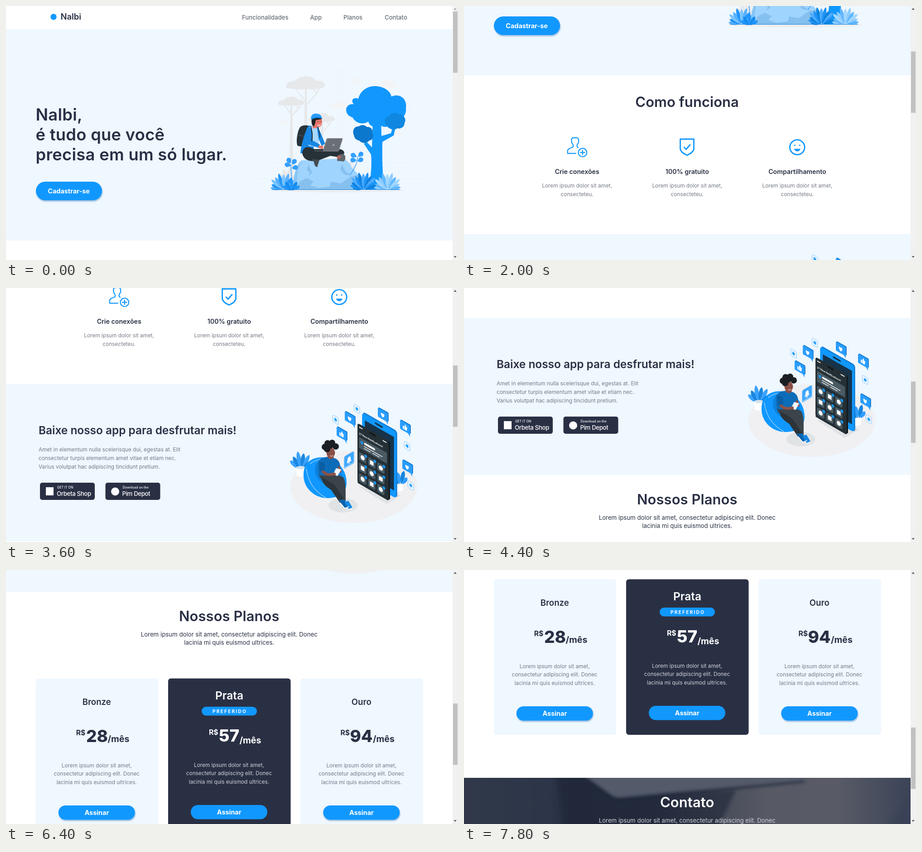
An HTML page for the animation above (8 s loop, 998 px wide and 561 px high).

```html
<!DOCTYPE html>
<html lang="pt">
<head>
<meta charset="utf-8">
<title>Página</title>
<style>
html,body{margin:0;width:100%;height:100%;overflow:hidden;background:#fff}
#stage{position:fixed;inset:0;overflow:hidden;contain:strict}
#page,#bar{position:absolute;left:0;top:0;display:block}
text{font-family:Inter,sans-serif;font-optical-sizing:none;fill:#2a3044}
.m{text-anchor:middle}
.logo{font-size:18.4px;font-weight:600}
.nav{font-size:13.1px;font-weight:500;letter-spacing:.04px;fill:#656b75}
.h1{font-size:36.3px;font-weight:600;letter-spacing:.3px}
.h2{font-size:30.9px;font-weight:600;letter-spacing:.1px}
.h3{font-size:24.4px;font-weight:600}
.feat{font-size:14.2px;font-weight:600}
.body{font-size:11.8px;fill:#747a84}
.sub{font-size:13.25px}
.btn{font-size:14.4px;font-weight:700;fill:#fff}
.plan{font-size:18.6px;font-weight:600}
.top{font-size:24.5px;font-weight:600}
.tag{font-size:10.2px;font-weight:700;letter-spacing:2.2px;fill:#fff}
.cur{font-size:15.8px;font-weight:700}
.num{font-size:37px;font-weight:800}
.per{font-size:19.5px;font-weight:700}
.get{font-size:7.1px;font-weight:500}
.shop{font-size:13.3px;font-weight:500;letter-spacing:-.4px}
.news{font-size:5.7px;font-weight:700}
.w{fill:#fff}
.pale{fill:#d2d4d9}
</style>
</head>
<body>
<div id="stage">
<svg id="page" width="986" height="2000"></svg>
<svg id="bar" width="998" height="561">
  <rect x="986" width="12" height="561" fill="#f1f1f1"/>
  <path id="up" d="M988.5 8.2L991.7 4.6L995 8.2Z" fill="#505050"/>
  <path d="M988.5 552.4L991.7 556L995 552.4Z" fill="#505050"/>
  <rect id="thumb" x="987" y="12" width="10" height="135.5" fill="#c1c1c1"/>
</svg>
</div>
<script>
const BLUE = '#1198ff', DARK = '#2a3044', SKY = '#eff7ff', GREY = '#e6e8ea', COAL = '#263238';

const path = (d, fill, more = '') => `<path d="${d}" fill="${fill}" ${more}/>`;
const line = (d, color, w = 1) => path(d, 'none', `stroke="${color}" stroke-width="${w}" stroke-linecap="round" stroke-linejoin="round"`);
const rect = (x, y, w, h, fill, r = 0, more = '') => `<rect x="${x}" y="${y}" width="${w}" height="${h}" rx="${r}" fill="${fill}" ${more}/>`;
const oval = (x, y, rx, ry, fill) => `<ellipse cx="${x}" cy="${y}" rx="${rx}" ry="${ry}" fill="${fill}"/>`;
const dot = (x, y, r, fill) => oval(x, y, r, r, fill);
const text = (x, y, cls, s) => `<text x="${x}" y="${y}" class="${cls}">${s}</text>`;
const lines = (x, y, step, cls, list) => list.map((s, i) => text(x, y + i * step, cls, s)).join('');
const at = (x, y, s) => `<g transform="translate(${x} ${y})">${s}</g>`;
const iso = (x, y, s, slope = .5) => `<g transform="matrix(.88 ${slope} 0 1 ${x} ${y})">${s}</g>`;
const leaf = (x, y, len, w, deg, fill) =>
  path(`M0 0C${-w} ${-len * .45} ${-w} ${-len * .85} 0 ${-len}C${w} ${-len * .85} ${w} ${-len * .45} 0 0Z`, fill, `transform="translate(${x} ${y}) rotate(${deg})"`);

// Leaves spread from one root, shorter towards the sides
function fan(x, y, n, len, spread, fills, w = 5) {
  let s = '';
  for (let i = 0; i < n; i++) {
    const k = i / Math.max(n - 1, 1) * 2 - 1;
    s += leaf(x + k * 4, y, len * (1 - .32 * k * k - .1 * (i % 2)), w, k * spread, fills[i % fills.length]);
  }
  return s;
}

let seed = 7;
const rnd = () => (seed = seed * 16807 % 2147483647) / 2147483647;
let specks = '';
for (let i = 0; i < 34; i++) specks += rect((rnd() * 30).toFixed(1), (rnd() * 30).toFixed(1), .9, .9, '#0a5fa8');

const defs = `<defs>
<pattern id="grain" width="30" height="30" patternUnits="userSpaceOnUse"><g opacity=".3">${specks}</g></pattern>
<filter id="soft" x="-20%" y="-40%" width="140%" height="190%"><feGaussianBlur stdDeviation="1.5"/></filter>
<filter id="haze" x="-20%" y="-40%" width="140%" height="180%"><feGaussianBlur stdDeviation="3"/></filter>
<linearGradient id="desk"><stop offset="0" stop-color="#30384a"/><stop offset=".19" stop-color="#2d3548"/><stop offset=".24" stop-color="#242b3e"/><stop offset=".42" stop-color="#293043"/><stop offset=".56" stop-color="#454a58"/><stop offset=".68" stop-color="#575a65"/><stop offset=".84" stop-color="#585b66"/><stop offset="1" stop-color="#3b4357"/></linearGradient>
<clipPath id="cut"><rect y="1846" width="986" height="154"/></clipPath>
</defs>`;

const pill = (x, y, w, h, shade = true) =>
  (shade ? rect(x + 1, y + 2.5, w, h, '#0b5ea8', h / 2, 'opacity=".42" filter="url(#soft)"') : '') + rect(x, y, w, h, BLUE, h / 2);
const grainy = (d, fill) => path(d, fill) + path(d, 'url(#grain)');

const cloud = (x, y, k) => `<g transform="translate(${x} ${y}) scale(${k})">${path('M-22 8C-26 1-17-3-13-1C-11-12 4-13 7-4C13-9 20-3 18 1C25 1 25 8 20 8Z', '#f3f4f6')}</g>`;

function savanna(x, y, w, h, base, tw) {
  const r = w / 2;
  return path(`M${x - r} ${y}C${x - r - 3} ${y - h * .5} ${x - r * .7} ${y - h * .6} ${x - r * .6} ${y - h * .55}C${x - r * .3} ${y - h * 1.15} ${x + r * .4} ${y - h * 1.1} ${x + r * .5} ${y - h * .6}C${x + r} ${y - h * .7} ${x + r + 3} ${y - h * .1} ${x + r * .85} ${y}C${x + r * .4} ${y + h * .15} ${x - r * .5} ${y + h * .15} ${x - r} ${y}Z`, GREY)
    + path(`M${x - 2} ${y}L${x + 2} ${y}L${x + tw} ${base}L${x - tw} ${base}Z`, GREY)
    + line(`M${x} ${y + r * .9}L${x + r * .55} ${y + r * .3}L${x + r * .7} ${y}M${x + r * .55} ${y + r * .3}L${x + r * .35} ${y}M${x} ${y + r * .7}L${x - r * .4} ${y + r * .22}L${x - r * .5} ${y}`, GREY, 2.2);
}

function forest() {
  return line('M583 141H732V346H583ZM742 141H891V346H742ZM552 382H926', '#eaf1f8', .8)
    + cloud(771, 165, .55) + cloud(842, 172, .95) + cloud(735, 219, .95) + cloud(612, 257, .55) + cloud(862, 281, .55)
    + oval(732, 407, 148, 4.5, '#ebeef2')
    + savanna(662, 181, 86, 26, 390, 5) + savanna(630, 218, 58, 18, 385, 4.5) + savanna(698, 254, 56, 18, 350, 4)
    + fan(620, 392, 4, 38, 28, [GREY], 6) + fan(757, 365, 4, 34, 32, [GREY], 4);
}

function bigTree() {
  return path('M810 250H828L829 287L850 281L854 266L860 268L856 286L831 300C830 345 832 385 837 405H800C806 380 808 350 806 328L790 304L796 300L808 312Z', BLUE)
    + path('M810 255H828L836 405H801L808 330Z', 'url(#grain)')
    + grainy('M765 246C745 241 747 214 768 217C758 205 772 201 778 205C782 186 800 176 816 177C838 178 850 191 851 200C868 192 886 204 883 224C885 244 872 252 860 250C850 270 832 270 826 262C815 270 802 266 800 255C790 263 772 260 765 246Z', BLUE)
    + grainy('M838 259C833 249 840 243 846 244C848 235 862 234 866 239C878 238 885 250 880 258C880 269 869 272 864 270C855 277 841 270 838 259Z', '#0f88e2')
    + grainy('M768 285C764 275 769 265 779 266C784 261 794 263 796 267C806 266 811 274 809 281C814 289 808 297 802 297C796 305 784 303 780 297C774 297 769 292 768 285Z', '#0c78cd');
}

function rock() {
  return path('M632 405C634 380 640 352 652 341L738 337C752 338 760 347 763 356L778 372L790 405Z', '#9fd4ff')
    + path('M632 405C634 380 640 352 652 341L644 368L641 405Z', '#8cc5f3')
    + path('M641 405L648 388L664 380L679 387L672 396L690 402L715 399L718 388L739 392L762 376L778 373L790 405Z', '#86c0ee')
    + path('M668 350L664 362L671 368L668 376L676 368ZM742 350L738 361L747 372L764 375L750 366Z', '#86c0ee');
}

function sprig(x, y, root, base, list) {
  return line(`M${x} ${y}Q${x} ${(y + base) / 2} ${root} ${base}`, '#2497ff', 1.3)
    + list.map(([dx, dy, a]) => leaf(x + dx, y + dy, 14, 7, a, '#349fff')).join('');
}

function hiker() {
  const skin = '#e8786c';
  return path('M650 267C655 262 668 263 671 266L663 312L644 309C639 301 644 273 650 267Z', COAL)
    + line('M646 285L658 288', '#42525a', 1.5)
    + path('M669 264C661 272 651 309 650 325L664 327L679 318L684 266Z', '#1687e4')
    + path('M671 266L690 265C693 280 692 298 689 312L668 309Z', '#a8d8ff')
    + path('M677 256L689 260L688 270L677 270Z', skin)
    + path('M678 248H697C699 258 697 267 690 268C682 268 677 259 678 248Z', skin)
    + path('M676 247C673 256 675 264 680 266L683 258L684 252L697 250L690 246Z', '#1d2326')
    + path('M674 250C671 239 682 236 688 238C696 239 698 246 697 249C688 246 681 246 674 250Z', '#2a9bff')
    + line('M675 250Q686 244 697 248', '#0d74c6', 2)
    + line('M688 256L690 256M695 255L696 255', '#2b2022', 1.2) + line('M688 263Q691 265 694 262', '#fff', 1.2)
    + path('M654 324C657 309 668 309 680 316L736 316C752 318 749 332 736 334L716 331L690 341C672 345 656 341 654 324Z', COAL)
    + path('M676 338L692 340L687 356C682 355 680 348 680 345Z', '#454d52')
    + path('M732 330L744 326L749 331C750 339 748 345 742 343L731 342Z', '#5d666c') + path('M730 333L738 329L740 336L732 338Z', '#b5655c')
    + path('M666 267C658 280 664 302 668 306L690 313L693 306L677 297L674 271Z', '#1687e4')
    + path('M686 265C695 276 700 296 705 304L697 309L690 293Z', '#1687e4')
    + line('M673 267Q678 284 675 298', COAL, 2.2) + line('M689 268Q693 280 693 290', COAL, 1.6)
    + path('M690 308L701 309L699 316L690 314Z', skin)
    + path('M680 319L733 319V322L682 321Z', '#53585e')
    + path('M708 293Q709 292 711 292H742Q744 292 743 295L735 320Q734 321 732 321H699Z', '#757a80')
    + path('M711 294H741L733 319H702Z', '#6a6f75') + dot(723, 307, 2.3, '#9ba0a5');
}

function bushes() {
  const mix = ['#58b2ff', '#2396fb', '#7cc5ff'];
  return sprig(629, 350, 633, 396, [[0, 2, -80], [-1, -2, -25], [3, 0, 35], [2, 8, 80]])
    + sprig(776, 333, 760, 372, [[-2, 0, -65], [2, 0, 45], [-2, 8, -85], [0, 10, 65]])
    + oval(629, 403, 15, 4, '#0d79d0') + fan(613, 405, 11, 37, 82, mix) + fan(630, 405, 5, 24, 65, ['#2195fa', '#148cf0'])
    + oval(777, 402, 11, 5, '#0d79d0') + fan(789, 405, 11, 39, 70, ['#2094f8', '#0f83df', '#4dabff'])
    + fan(842, 405, 11, 38, 80, ['#8fcdff', '#62b8ff', '#a5d8ff'])
    + rect(587, 405, 283, 1, '#1180da');
}

function features() {
  const icon = 'fill="none" stroke-linejoin="round" stroke-linecap="round"';
  const user = `<g ${icon} stroke="${BLUE}" stroke-width="2.2">
    <path d="M247 325.7H228.8V320C229 315.5 234 314 240 312C242 310 241 307 240 305C237.5 303 237.5 300 237.5 298C236.5 292 240 290.5 243 291.5C249 289 254 292 253 298C254 300 252.500 303 250.500 305C249 308 249.500 311 252 312.500"/>
    <circle cx="261.800" cy="323.700" r="9.300"/><path d="M257 323.700H266.600M261.800 319V328.500"/></g>`;
  const shield = `<g ${icon} stroke="${BLUE}" stroke-width="2.8"><path d="M477.5 294H507.5V315C507 322 500 326 492.5 329.5C485 326 478 322 477.5 315Z"/><path d="M486 312L490.5 316.5L499 306.5"/></g>`;
  const smile = `<circle cx="735.8" cy="312" r="16.4" ${icon} stroke="${BLUE}" stroke-width="2.9"/>`
    + dot(730.3, 307.6, 1.6, BLUE) + dot(741.3, 307.6, 1.6, BLUE) + path('M728.8 315.5H742.8C741 323 730.6 323 728.8 315.5Z', BLUE);
  return at(0, 365, user + shield + smile)
    + [[249.7, 'Crie conexões'], [492.8, '100% gratuito'], [735.9, 'Compartilhamento']].map(([x, s]) =>
      text(x, 736, 'feat m', s) + lines(x, 766, 19, 'body m', ['Lorem ipsum dolor sit amet,', 'consecteteu.'])).join('');
}

const badge = (x, small, big, mark) =>
  at(x, 1087, rect(0, 0, 121, 38, DARK, 5) + mark + text(38, 13, 'get w', small) + text(37, 28.5, 'shop w', big));

const heart = path('M12 16C6 12 7 6 10 7Q12 7 12 9Q12 7 14 7C17 6 18 12 12 16Z', '#fff');
const thumb = path('M7 9H10V16H7ZM11 9L13 4Q15 4 15 8H18L17 16H11Z', '#fff');
const bubble = (x, y, mark) => iso(x - 11, y - 16,
  rect(2, -2, 25, 20, '#0c78cd', 2) + rect(0, 0, 25, 20, '#2a9dff', 2) + path('M19 19H25V25Z', '#2a9dff') + mark);
const star = (x, y) => iso(x - 6.5, y - 11,
  rect(0, 0, 14, 15, '#f5faff', 2.5, 'stroke="#6fbcff" stroke-width=".8"') + line('M7 4V11M4 5.7L10 9.3M10 5.7L4 9.3', BLUE, 1.8));

function phone() {
  let tiles = '';
  for (let i = 0; i < 9; i++) {
    const x = 13 + i % 3 * 22.8, y = 70.5 + (i / 3 | 0) * 23.6;
    tiles += rect(x - 9, y - 9, 18, 18, '#4a5a63', 3) + (i % 2 ? rect(x - 4.5, y - 4.5, 9, 9, '#fff') : dot(x, y, 5, '#fff')) + dot(x + 8, y - 7.5, 3.3, BLUE);
  }
  return iso(788, 273, rect(0, 0, 86, 148, '#0d7dd7', 6) + rect(-2, 3, 85, 147, BLUE, 6) + rect(5, 17, 73, 118, '#17334a') + rect(30, 8, 20, 4, '#17334a', 2))
    + path('M776 430L843 469L848 466V340L843 338Z', '#141c20')
    + iso(776, 298, rect(0, 0, 78, 132, '#243036', 5)
      + line('M5 7H12M64 7H72', '#fff', 2) + rect(30, 4, 16, 4, '#10171a', 2)
      + text(4, 23, 'news w', '27 New Notifications!')
      + rect(4, 29, 70, 24, '#4a5a63', 2) + dot(11, 38, 3.3, BLUE)
      + line('M19 37H42', '#fff', 4.5) + line('M17 43.5H62M17 48H32M38 48H55', '#fff', 1.5) + tiles);
}

function reader() {
  const skin = '#8d5148';
  return oval(744, 480, 32, 16, '#e0e3e5')
    + fan(651, 400, 6, 40, 46, ['#3aa3ff', '#1b86dd'], 6) + path('M640 398C640 392 662 392 662 398L660 414C656 418 646 418 642 414Z', '#fff') + oval(651, 397, 10, 3.5, '#d8e3eb')
    + path('M657 412C657 386 675 374 697 374C728 376 752 398 752 430C752 456 730 465 706 464C675 461 656 437 657 412Z', BLUE)
    + line('M663 399Q669 443 706 463M672 388Q686 377 706 377', '#bfe2ff', 1.1)
    + path('M686 386C676 404 684 430 713 434L746 431C744 400 720 378 686 386Z', '#0c82df')
    + path('M690 410C702 408 735 411 744 418C751 424 750 450 750 470L741 474C736 459 731 445 722 436C711 434 695 429 690 410Z', '#3b444a')
    + path('M698 418C712 428 724 430 730 442L747 467L737 474L718 446C706 438 696 430 698 418Z', '#2c3439')
    + path('M734 468L747 467L757 482L748 486Z', '#0b64ad') + path('M747 472L756 470L765 485L756 489Z', '#1687e4')
    + line('M739 476L748 486.5L757 483M754 487L757 489L765 486', '#fff', 1.6)
    + path('M690 382C697 373 708 372 719 374C735 377 738 386 738 398L724 414H692C688 404 688 392 690 382Z', '#0d6cb8')
    + path('M709 362H725L723 376Q716 381 710 374Z', skin) + oval(717, 364, 9.5, 11, skin)
    + [[704, 351], [710, 343], [720, 342], [728, 350], [716, 348], [709, 356]].map(([x, y]) => dot(x, y, 7, '#1b1f22')).join('')
    + dot(713, 366, .8, '#222') + dot(722, 365, .8, '#222') + line('M716 371Q719 373 722 370', '#fff', 1)
    + line('M698 403Q706 415 722 411M735 397L738 405', skin, 6) + path('M692 384L703 386L705 402L693 406Z', '#0b5ea3')
    + path('M729 398L740 401L732 415L722 412Z', '#f4f7fa', 'stroke="#c7d2da" stroke-width=".7"') + dot(725, 411, 3.2, skin);
}

function appScene() {
  return oval(768, 439, 140, 80, '#f0f0f2')
    + path('M778 438L840 477L872 459L860 450Z', '#e0e2e5')
    + fan(871, 434, 4, 32, 34, ['#1485e0', '#319eff'], 6) + path('M859 433H878L876 447Q868 452 861 447Z', '#fff')
    + phone() + star(775, 267) + star(728, 291) + star(886, 349) + star(894, 436)
    + bubble(759, 288, heart) + bubble(741, 322, thumb) + bubble(832, 280, heart) + bubble(881, 307, thumb) + bubble(886, 395, heart)
    + reader()
    + iso(746, 374, rect(0, 0, 26, 26, '#8bcaff', 2) + rect(1.5, -1.5, 23, 24, '#3fa7ff', 2) + path('M7 17Q9 15 9 10Q10 5 13 5Q17 5 17 10Q17 15 19 17ZM11 18H15V20H11Z', '#fff'), -.5);
}

function card(x, name, price, [cx, nx, px], main) {
  const c = x + 135, up = main ? 1 : 0, tone = main ? ' w' : '';
  return rect(x, 1407.5, 270.5, 343.5, main ? DARK : SKY, 6)
    + (main ? text(c, 1454, 'top m w', name) + rect(c - 61, 1470, 122, 19.5, BLUE, 9.75) + text(c + 1, 1483.6, 'tag m', 'PREFERIDO')
      : text(c - .5, 1465.6, 'plan m', name))
    + text(cx, 1533 - up, 'cur' + tone, 'R$') + text(nx, 1548 - up, 'num' + tone, price) + text(px, 1547.5 + up * 3, 'per' + tone, '/mês')
    + lines(c - .5, 1604 - up, 18.3, 'body m' + (main ? ' pale' : ''), ['Lorem ipsum dolor sit amet,', 'consectetur adipiscing elit. Donec', 'lacinia mi quis euismod ultrices.'])
    + pill(x + 50, 1688 - up, 169, 31.5, !main) + text(c - .3, 1709 - up, 'btn m', 'Assinar');
}

const lorem = ['Lorem ipsum dolor sit amet, consectetur adipiscing elit. Donec', 'lacinia mi quis euismod ultrices.'];

function contact() {
  return `<g clip-path="url(#cut)">${rect(0, 1846, 986, 154, 'url(#desk)')}<g filter="url(#haze)">`
    + path('M205 1840L290 1840L345 1892L600 1873L540 2000H230Z', '#20273a', 'opacity=".6"')
    + path('M262 1838H752V1850L345 1889Q333 1889 326 1884Z', '#535a6a') + line('M300 1872L338 1893L750 1854', '#1f2638', 4)
    + path('M890 2000L986 1890V2000Z', '#384156', 'opacity=".6"')
    + '</g></g>' + text(492.7, 1911, 'h2 m w', 'Contato') + lines(492.8, 1945, 18.3, 'sub m pale', lorem);
}

document.getElementById('page').innerHTML = defs
  + rect(0, 0, 986, 2000, '#fff') + rect(0, 51, 986, 467, SKY) + rect(0, 869, 986, 347, SKY)
  + dot(105, 24, 6.7, BLUE) + text(120.5, 30, 'logo', 'Nalbi')
  + [[521, 'Funcionalidades'], [671.5, 'App'], [745, 'Planos'], [836, 'Contato']].map(([x, s]) => text(x, 30, 'nav', s)).join('')
  + lines(65.5, 253, 44.2, 'h1', ['Nalbi,', 'é tudo que você', 'precisa em um só lugar.'])
  + pill(66, 388, 146, 41) + text(138.6, 413.5, 'btn m', 'Cadastrar-se')
  + forest() + bigTree() + rock() + hiker() + bushes()
  + text(492.6, 588, 'h2 m', 'Como funciona') + features()
  + text(72, 980, 'h3', 'Baixe nosso app para desfrutar mais!')
  + lines(72, 1018, 19, 'body', ['Amet in elementum nulla scelerisque dui, egestas at. Elit', 'consectetur turpis elementum amet vitae et etiam nec.', 'Varius volutpat hac adipiscing tincidunt pretium.'])
  + badge(75, 'GET IT ON', 'Orbeta Shop', rect(13, 10, 17, 18, '#fff'))
  + badge(219.5, 'Download on the', 'Pim Depot', dot(21.5, 19.5, 9, '#fff'))
  + at(0, 657, appScene())
  + text(492.8, 1281, 'h2 m', 'Nossos Planos') + lines(492.8, 1315, 18.3, 'sub m', lorem)
  + card(65.7, 'Bronze', '28', [154.7, 177, 224.5])
  + card(358, 'Prata', '57', [448, 470, 515.5], true)
  + card(650.3, 'Ouro', '94', [738.5, 759.5, 810])
  + contact();

// The wheel moves the page one notch at a time; the last notch comes late.
const LOOP = 8000, NOTCH = 73, RATIO = .2422;
const stops = Array.from({ length: 20 }, (_, i) => i < 19 ? i * 400 : 7800);
function play(id, frame) {
  const keys = stops.map((ms, i) => ({ ...frame(i), offset: ms / LOOP, easing: 'step-end' }));
  keys.push({ ...frame(19), offset: 1 });
  document.getElementById(id).animate(keys, { duration: LOOP, iterations: Infinity });
}
play('page', i => ({ transform: `translateY(${-i * NOTCH}px)` }));
play('thumb', i => ({ transform: `translateY(${i * NOTCH * RATIO}px)` }));
play('up', i => ({ fill: i ? '#505050' : '#a3a3a3' }));
</script>
</body>
</html>
```
